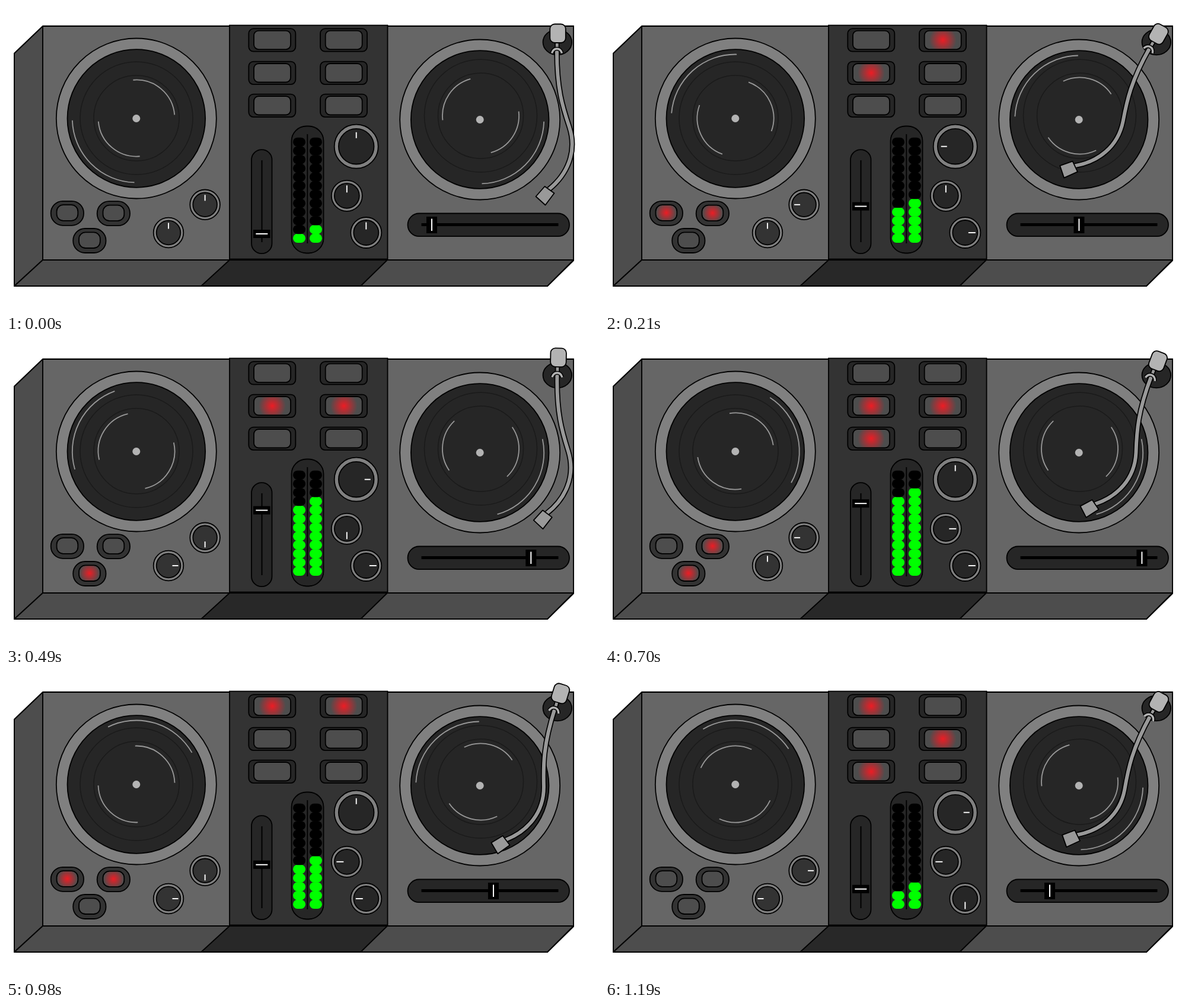
An HTML page for the animation above (1260 ms loop, 1000 px wide and 514 px high).

```html
<!DOCTYPE html>
<html lang="en">
<head>
<meta charset="utf-8">
<title>Turntable console</title>
<style>
  html, body { margin: 0; width: 100%; height: 100%; overflow: hidden; background: #fff; }
  svg { display: block; width: 100vw; height: 100vh; }
</style>
</head>
<body>
<svg id="stage" viewBox="0 0 1000 514">
  <defs>
    <radialGradient id="glow">
      <stop offset="0" stop-color="#ed1c24"/>
      <stop offset="1" stop-color="#4d4d4d"/>
    </radialGradient>
  </defs>
</svg>
<script>
const STEP = 70, STEPS = 18;
const DARK = '#262626', PANEL = '#333', SIDE = '#4d4d4d', RIM = '#808080', LIGHT = '#b3b3b3', METAL = '#999';
const stage = document.getElementById('stage');

function add(tag, attrs, parent = stage) {
  const el = document.createElementNS('http://www.w3.org/2000/svg', tag);
  for (const name in attrs) el.setAttribute(name, attrs[name]);
  return parent.appendChild(el);
}
const ink = fill => ({ fill, stroke: '#000', 'stroke-width': 1.8 });
const poly = (points, fill, parent) => add('polygon', { points, ...ink(fill), 'stroke-linejoin': 'round' }, parent);
const disc = (cx, cy, r, fill) => add('circle', { cx, cy, r, ...ink(fill) });
const box = (x, y, width, height, rx, fill, parent) =>
  add('rect', { x, y, width, height, rx, ...ink(fill) }, parent);
const line = (x1, y1, x2, y2, stroke, width, parent) =>
  add('line', { x1, y1, x2, y2, stroke, 'stroke-width': width }, parent);
const curve = (d, stroke, width, parent) =>
  add('path', { d, fill: 'none', stroke, 'stroke-width': width }, parent);
const move = (el, transform) => el.setAttribute('transform', transform);

// Case
add('polygon', { points: '62,32.7 13.2,79.3 13.2,472.8 913.6,472.8 957.8,429.5 957.8,32.7' });
poly('62,34 14,80 14,472 62,428', SIDE);
poly('62,428 957,428 913,472 14,472', SIDE);
poly('62,34 957,34 957,428 62,428', '#666');
poly('377,428 643,428 598,472 329,472', '#282828');
box(377, 32.5, 266.5, 394, 0, PANEL);

// A light streak centred on angle 0; returns its turning function
function streak(cx, cy, r, span) {
  const half = span * Math.PI / 360, dx = r * Math.cos(half), dy = r * Math.sin(half);
  const el = curve(`M${cx + dx} ${cy - dy}A${r} ${r} 0 0 1 ${cx + dx} ${cy + dy}`, METAL, 1.8);
  return angle => move(el, `rotate(${angle} ${cx} ${cy})`);
}
function platter(cx, cy, ringX, ringY, span) {
  disc(cx, cy, 135, RIM);
  disc(cx, cy, 116.3, DARK);
  for (const r of [95, 72])
    add('circle', { cx: ringX, cy: ringY, r, fill: 'none', stroke: '#1a1a1a', 'stroke-width': 1.5 });
  const near = streak(ringX, ringY, 64.5, span), far = streak(ringX, ringY, 64.5, span);
  const edge = streak(cx, cy, 108, 86.5);
  add('circle', { cx, cy, r: 6.5, fill: LIGHT });
  return ([inner, outer]) => { near(inner); far(inner + 180); edge(outer); };
}
const spinLeft = platter(219.8, 189.5, 220, 189, 90);
const spinRight = platter(799.2, 191.5, 800.5, 185, 81);

// Buttons, each with a glow clipped to its face
const lamps = [];
function button(x, y, w, h, r, fill, dx, dy, iw, ih, ir, glow) {
  const face = { x: x + dx, y: y + dy, width: iw, height: ih, rx: ir };
  const id = 'face' + lamps.length;
  box(x, y, w, h, r, fill);
  add('rect', face, add('clipPath', { id }));
  lamps.push(add('g', {}));
  add('rect', { ...face, fill: SIDE }).after(lamps.at(-1));
  add('circle', { cx: face.x + iw / 2, cy: face.y + ih / 2, r: glow, fill: 'url(#glow)', 'clip-path': `url(#${id})` }, lamps.at(-1));
  add('rect', { ...face, ...ink('none') });
}
for (const y of [38.2, 93.6, 148.6])
  for (const x of [409.3, 530])
    button(x, y, 79, 38.5, 8, DARK, 8.7, 3.4, 62, 31.5, 8, 23);
for (const [x, y] of [[75.7, 328.8], [153.7, 329.2], [113.2, 375]])
  button(x, y, 55.3, 41, 20, PANEL, 9.8, 6.4, 35.8, 26.6, 11, 17);

// Knobs; each returns its tick's turning function
function knob(x, y, rim, face, fill, from, length) {
  disc(x, y, rim, RIM);
  disc(x, y, face, fill);
  const tick = line(x, y - from, x, y - from - length, '#fff', 1.9);
  return angle => move(tick, `rotate(${angle} ${x} ${y})`);
}
const knobs = [
  knob(590.7, 236.7, 37, 29.8, DARK, 14, 10),
  knob(574.8, 319.8, 26, 21, DARK, 5.5, 12),
  knob(607.3, 382, 26, 21, DARK, 5.5, 12),
  knob(335.6, 334.8, 25.3, 20.3, PANEL, 6.5, 10),
  knob(274, 382, 25.3, 20.3, PANEL, 6.5, 10)
];

// Level meter
box(481.5, 202.5, 54, 214, 25, DARK);
line(508.3, 216, 508.3, 400, '#000', 1.8);
const meter = [494.5, 522.4].map(x => Array.from({ length: 12 }, (_, i) =>
  add('rect', { x: x - 10.5, y: 383.7 - i * 14.73, width: 21, height: 15.3, rx: 7.5 })));

// Faders
box(414, 242.2, 34.5, 175, 17, DARK);
line(431.5, 260, 431.5, 398, '#000', 2);
const vFader = add('g', {});
add('rect', { x: 417, y: -7, width: 28.5, height: 14 }, vFader);
line(421.3, 0, 441.3, 0, '#fff', 2, vFader);

box(677.5, 349.5, 272.5, 38.7, 19.3, DARK);
line(700.5, 368.5, 931.5, 368.5, '#000', 5);
const hFader = add('g', {});
add('rect', { x: -9, y: 355, width: 18, height: 28 }, hFader);
line(0, 358.5, 0, 379, '#fff', 2, hFader);

// Tonearm, drawn around the middle of its weight
add('ellipse', { cx: 929.8, cy: 61, rx: 24.3, ry: 21.3, ...ink(DARK) });
const arm = add('g', {});
const tube = 'M-1.5 28C-2 92 8 124 19.5 158C33 200 16 238 -15 263';
curve(tube, '#000', 9.4, arm);
curve(tube, METAL, 6, arm);
poly('-22,258 -6,269.5 -21,289.5 -37,275', METAL, arm);
box(-4.5, 14, 6.5, 10, 0, METAL, arm);
const collar = 'M-10 33.5C-7 23.5 4 23.5 7 33.5';
curve(collar, '#000', 6.4, arm);
curve(collar, LIGHT, 3.4, arm);
box(-13.2, -15.5, 26.5, 31.5, 8, LIGHT, arm);

// Key poses: arm is angle, x, y; spin is inner and outer streak angle;
// lit lists button numbers; knobs point up, right, down or left
const cues = [
  { at: 0, arm: [0, 930.5, 46], spin: [310, 135], lit: '', knobs: 'URUUU'.replace('R', 'U') },
  { at: 2, arm: [28.3, 934, 50], spin: [335, 228], lit: '1267', knobs: 'LURLU' },
  { at: 5, arm: [30.9, 932.5, 41], spin: [224, 33], lit: '0356', knobs: 'DRUUU' },
  { at: 7, arm: [1, 931.5, 31], spin: [212, 207], lit: '238', knobs: 'RDRDR' },
  { at: 10, arm: [20.5, 932.5, 37], spin: [306, 346], lit: '23478', knobs: 'URRLU' },
  { at: 14, arm: [17.2, 935, 36], spin: [313, 287], lit: '0167', knobs: 'ULLDR' },
  { at: 17, arm: [28.3, 934, 50], spin: [250, 283], lit: '034', knobs: 'RLDRL' }
];
const rightSpins = [[214, 45], [285, 226], [186, 31]];

function draw(step) {
  const level = Math.min(step, STEPS - step);
  const travel = 32 * level ** 0.85;
  const index = cues.findLastIndex(cue => cue.at <= step);
  const cue = cues[index], next = cues[index + 1] || cue;
  const mix = (step - cue.at) / (next.at - cue.at || 1);
  const [angle, x, y] = cue.arm.map((v, i) => v + (next.arm[i] - v) * mix);

  meter.forEach((column, side) => column.forEach((led, i) =>
    led.setAttribute('fill', i <= level + side ? '#0f0' : '#000')));
  move(vFader, `translate(0 ${384 - travel * 0.57})`);
  move(hFader, `translate(${718 + travel} 0)`);
  move(arm, `translate(${x} ${y}) rotate(${angle})`);
  spinLeft(cue.spin);
  spinRight(rightSpins[level < 2 ? 0 : level < 5 ? 1 : 2]);
  lamps.forEach((lamp, i) => lamp.setAttribute('visibility', cue.lit.includes(i) ? 'visible' : 'hidden'));
  knobs.forEach((turn, i) => turn('URDL'.indexOf(cue.knobs[i]) * 90));
}

const start = performance.now();
let shown = -1;
function play(now) {
  const step = Math.floor(Math.max(0, now - start) / STEP) % STEPS;
  if (step !== shown) draw(shown = step);
  requestAnimationFrame(play);
}
draw(0);
requestAnimationFrame(play);
</script>
</body>
</html>
```
